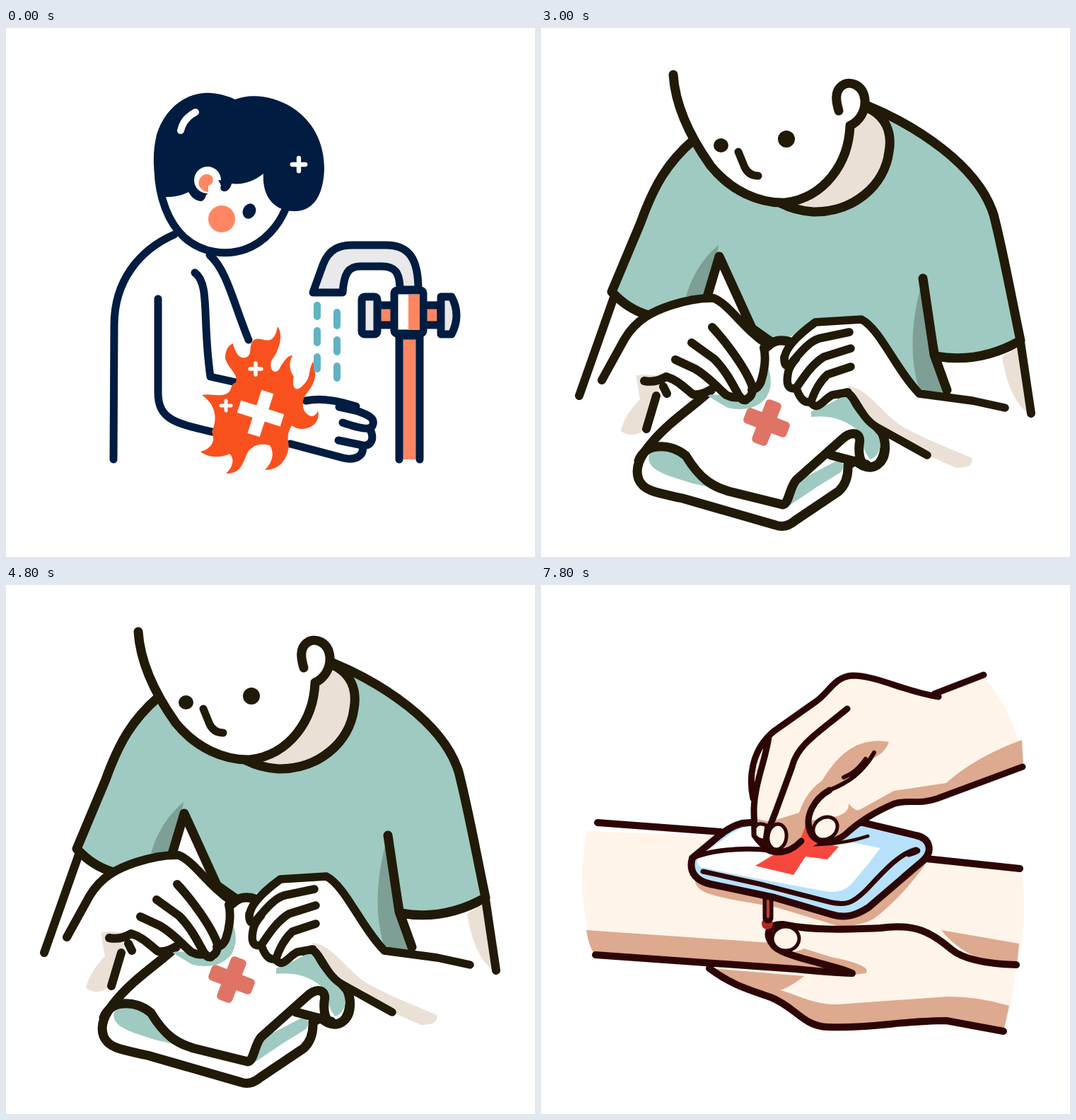
These frames come from a looping animation (748x748 px, 9 s). An HTML page:

```html
<!DOCTYPE html>
<html lang="en">
<head>
<meta charset="utf-8">
<title>Burn first aid</title>
<style>
html, body { margin: 0; height: 100%; overflow: hidden; background: #fff; }
svg { display: block; width: 100vw; height: 100vh; }
.scene { visibility: hidden; stroke-linecap: round; stroke-linejoin: round; fill: none; }
.scene.on { visibility: visible; }
.flat { stroke: none; }
.white { fill: #fff; }
#rinse { stroke: #001c41; stroke-width: 11; }
#rinse .navy { fill: #001c41; }
#rinse .coral { fill: #ff8662; }
#rinse .grey { fill: #e9e8ea; }
#rinse .fire { fill: #f9511e; }
#rinse .water { stroke: #61b2c5; stroke-width: 10; }
#wrap { stroke: #211a09; stroke-width: 13; }
#wrap .teal { fill: #9fcac1; }
#wrap .shade { fill: #7e9f96; }
#wrap .beige { fill: #eae0d5; }
#wrap .ink { fill: #211a09; }
#wrap .cross { fill: #df7466; stroke: #df7466; stroke-width: 11; }
#press { stroke: #2d0505; stroke-width: 10; }
#press .skin { fill: #fef4e9; }
#press .shade { fill: #dda98f; }
#press .blue { fill: #b7e1fa; }
#press .red { fill: #f8483d; }
#press .nail { fill: #fef4e9; stroke-width: 5; }
</style>
</head>
<body>
<svg viewBox="0 0 748 748">
<defs>
  <path id="spark" d="M-8 0H8M0-8V8" stroke="#fff" stroke-width="5.5"/>
</defs>

<g id="rinse" class="scene">
  <!-- head -->
  <path class="white" d="M215 200C216 240 230 276 252 296C278 319 312 322 338 313C366 303 386 279 396 254"/>
  <path class="navy flat" d="M222 239C207 217 206 180 213 151C225 112 256 90 290 92C304 93 316 97 324 101C347 92 378 96 404 112C434 131 450 162 450 199C449 236 435 259 408 259C376 259 362 234 364 206C350 217 335 222 319 220C318 226 313 231 308 231C303 230 302 226 304 221L283 236Q281 244 276 245C267 244 262 239 258 232Q242 240 222 239Z"/>
  <circle class="white flat" cx="285" cy="215" r="19"/>
  <path class="coral flat" d="M286 232C276 231 271 223 273 216C276 206 287 204 292 211C294 217 291 222 286 223Z"/>
  <path class="white flat" d="M288 223L304 222L302 238H288Z"/>
  <path class="navy flat" d="M300 215L319 217Q317 231 308 231Q302 229 304 222Z"/>
  <path d="M247 145C250 132 258 124 268 119" stroke="#fff" stroke-width="10"/>
  <use href="#spark" transform="translate(414 193)scale(1.15)"/>
  <ellipse class="navy flat" cx="344" cy="259" rx="9" ry="11" transform="rotate(25 344 259)"/>
  <circle class="coral flat" cx="305" cy="270" r="19"/>
  <!-- body and arm -->
  <path d="M238 292C188 314 153 358 153 420L152 610M288 321C312 342 321 387 343 441M267 346C289 362 277 410 289 493L325 501M215 383V515C215 555 240 559 300 573"/>
  <path d="M424 527C450 522 475 529 495 535M471 536L498 542C514 548 521 552 519 560C517 570 503 567 476 558M515 568C521 580 517 592 504 590L470 583M504 591C507 605 494 612 477 608L402 588"/>
  <!-- flame -->
  <path class="fire flat" d="M384 422C393 433 386 457 376 469C371 481 379 491 386 483C391 474 397 463 405 463C399 475 401 485 407 493C403 508 410 516 419 506C432 496 427 483 434 472C442 493 434 506 424 518C415 532 421 547 432 549Q438 549 441 541C445 557 432 566 419 567Q411 567 404 562C396 575 399 583 400 593C396 614 384 625 366 625C377 614 380 601 373 590C360 587 352 589 345 596C336 603 338 631 311 630C322 620 323 608 316 602C302 609 285 607 275 599C293 594 296 582 291 571C300 551 296 532 277 519C290 516 304 523 314 516C321 509 316 505 325 501C329 489 314 482 310 467C310 456 314 449 321 446C324 460 331 470 341 465C349 460 342 448 351 441C359 436 368 446 377 439Q382 434 384 422Z"/>
  <path d="M-32 0H32M0-32V32" transform="translate(360 545)rotate(18)" stroke="#fff" stroke-width="18" stroke-linecap="butt"/>
  <use href="#spark" transform="translate(353 482)"/>
  <use href="#spark" transform="translate(311 534)scale(.9)"/>
  <!-- tap -->
  <path class="water" d="M440 392V408M440 428V445M440 465V482M468 402V421M468 441V458M468 478V495"/>
  <path class="grey" d="M434 374L448 335C457 311 473 307 490 307H537C569 307 583 325 583 370H557C557 344 549 337 531 337H501C484 337 478 347 476 374Z"/>
  <path class="coral" d="M556 610V435H585V610"/>
  <path class="coral" d="M523 392H615V420H523Z"/>
  <rect class="grey" x="503" y="380" width="22" height="53" rx="4"/>
  <path class="grey" d="M615 380H630Q644 406 630 433H615Z"/>
  <rect class="white" x="549" y="371" width="41" height="61" rx="4"/>
  <path class="coral flat" d="M569 377H585V427H569Z"/>
</g>

<g id="wrap" class="scene">
  <!-- shirt -->
  <path class="teal flat" d="M216 158C179 190 160 222 141 275L100 373Q123 398 152 406C180 390 205 382 238 380L252 323L298 424L325 443L347 440L390 415L455 413C480 430 505 490 535 516L574 514L560 462Q620 476 680 442C665 380 652 310 640 264C618 194 530 138 462 110Z"/>
  <path class="shade flat" d="M205 379Q219 333 251 307L238 380ZM540 354Q515 440 533 505L538 517L576 516Z"/>
  <path class="white flat" d="M257 345L288 409L247 378Z"/>
  <path d="M216 158C179 190 160 222 141 275L100 373Q123 398 152 406M462 110C530 138 618 194 640 264C653 314 665 380 678 442Q620 475 558 464M540 354L556 462L574 512M235 380L252 323L298 424"/>
  <!-- neck and head -->
  <path class="beige" d="M460 112C487 124 497 147 492 175C486 223 441 261 385 260Q357 258 338 247L437 137Z"/>
  <path class="white" d="M187 66C190 112 213 157 240 195C269 231 309 248 345 247C401 240 435 191 437 138C450 132 459 118 458 102C456 80 436 73 425 82C415 90 417 103 421 117"/>
  <path class="ink flat" d="M335 157a12 12 0 1 0 24 0a12 12 0 1 0-24 0M244 166a10.500 10 0 1 0 21 0a10.500 10 0 1 0-21 0"/>
  <path d="M279 175L288 197Q294 209 307 209" stroke-width="11"/>
  <!-- arm skin -->
  <path class="beige flat" d="M133 483Q151 490 174 488L163 525L149 566Q130 582 113 570Q118 547 140 525Q136 502 133 483ZM652 465L674 451L690 545Q662 527 652 465Z"/>
  <path d="M104 378L54 520M678 444L693 545M163 520L149 567" stroke-width="12"/>
  <!-- cloth -->
  <path class="white" d="M322 449Q333 438 353 444L420 515L485 578C489 602 480 620 467 621Q455 622 445 612L434 618Q435 642 421 655L360 696Q346 708 332 703L200 665C169 658 145 656 138 638C132 621 141 606 152 592C178 558 215 536 240 512Z"/>
  <path class="teal flat" d="M153 603Q184 587 208 614C227 643 241 648 267 656L215 644C172 631 148 624 153 603ZM350 676Q358 647 376 634L420 611Q432 616 424 628L390 649ZM382 542Q410 532 432 517Q442 543 460 557L481 581Q480 606 465 610Q453 594 453 574Q425 545 382 550ZM314 465Q333 497 319 522Q300 545 264 537L232 518L290 520Z"/>
  <path d="M138 612C146 588 181 585 205 605C225 638 242 648 265 655L342 674C351 672 351 650 361 639L425 582C439 569 454 571 450 589C448 613 457 624 470 620C489 614 489 591 483 574M410 604L460 617"/>
  <path class="cross" d="M-6-27H6V-6H27V6H6V27H-6V6H-27V-6H-6Z" transform="translate(319 558)rotate(21)"/>
  <!-- left hand -->
  <path class="white flat" d="M86 498L118 440C135 411 160 400 184 392Q218 381 244 382L315 452L311 500L288 526L256 515L215 515L175 492L145 490Z"/>
  <path d="M86 498L118 440C135 411 160 400 184 392Q218 381 244 382C267 391 285 425 322 449M315 452C319 468 315 488 311 500Q307 510 298 512M242 423C263 445 290 483 298 505Q302 522 287 526M213 445L245 468C261 484 270 502 280 520Q284 527 290 526M190 469L218 482C237 493 249 508 262 519Q272 524 282 522M146 499Q162 502 177 493C194 498 205 511 215 518Q226 520 242 510M173 507L178 517M298 424L325 443" stroke-width="12"/>
  <!-- right hand -->
  <path class="white flat" d="M344 470Q347 447 388 416L455 413C480 430 505 490 535 517L560 580L500 565Q456 511 432 511L408 518L386 537L374 527L355 509L349 486Z"/>
  <path class="beige flat" d="M433 506C462 508 480 545 515 566L550 583L609 608Q613 622 587 622L546 604L474 564Q447 545 433 506Z"/>
  <path d="M344 470Q343 449 388 416L453 412C480 426 501 482 535 517L610 527L656 537M432 515C446 522 451 550 474 564L546 604M436 430L393 439C375 445 360 468 350 478Q343 478 344 465M438 453L400 465C382 476 370 496 361 509Q345 513 349 490Q350 479 361 467M438 479L405 490C394 500 386 516 382 528Q370 533 362 512M382 530C392 543 401 523 412 519L434 515" stroke-width="11.5"/>
</g>

<g id="press" class="scene">
  <!-- forearm -->
  <path class="skin flat" d="M65 348L250 355L545 390L680 405Q688 475 674 537L560 500L480 487L400 546L75 522Q47 432 65 348Z"/>
  <path class="shade flat" d="M64 488L325 506L390 530L430 548L75 522Q67 508 64 488ZM566 488L676 507L673 537Q605 537 566 488ZM218 418C219 438 254 442 330 455L420 482Q452 483 472 471Q512 440 547 390L520 380Z"/>
  <path d="M80 336L254 349M545 387L677 401"/>
  <!-- supporting hand -->
  <path class="skin flat" d="M322 494C325 475 365 483 390 486C425 488 450 485 480 485C530 478 552 493 580 515Q610 537 672 537Q668 590 654 631L573 616L400 625C365 619 351 588 318 579L238 542L440 549C415 537 347 527 330 511Z"/>
  <path class="shade flat" d="M238 542L372 553Q356 566 339 573C368 582 390 594 420 593L575 582Q620 582 662 595L654 631L573 616L400 625C365 619 351 588 318 579ZM344 519Q361 520 372 514L410 526Q470 538 459 549L436 552Z"/>
  <path d="M238 542C270 566 294 572 325 583C360 597 371 624 405 625C470 627 510 616 573 616L654 631M77 523L360 543Q410 548 440 549C415 537 347 527 330 511C315 494 321 479 342 480C385 489 434 487 480 485C530 478 553 492 580 515Q604 535 672 537"/>
  <ellipse class="nail" cx="346" cy="500" rx="19" ry="17"/>
  <!-- drip -->
  <circle class="flat" cx="320" cy="479" r="8" fill="#b4261d"/>
  <path d="M321 443V471" stroke-width="15"/>
  <path d="M321 446V469" stroke="#b8432f" stroke-width="4"/>
  <!-- pad -->
  <path class="blue" d="M214 386C208 407 221 419 240 423L330 442L408 465C432 473 447 466 463 456L540 390C555 376 550 358 530 354L455 336Q350 330 284 337Q266 342 249 357Z"/>
  <path class="white flat" d="M226 381L258 360Q280 341 304 340L340 350L430 362L480 372Q462 396 442 419Q427 438 402 433L310 416L226 399Q217 393 226 381Z"/>
  <path class="red flat" d="M294 370L330 374L370 340L385 362L421 370L405 388L374 384L357 410L303 397L328 382Z"/>
  <path d="M214 386C237 376 282 370 324 375M229 405L310 423L403 447C432 455 441 449 458 433C482 408 504 381 530 374Q539 376 520 381" stroke-width="7"/>
  <path d="M382 367Q426 367 462 355" stroke-width="5"/>
  <!-- pressing hand -->
  <path class="skin flat" d="M626 131Q672 181 682 257L560 302C534 311 520 303 500 309Q459 326 430 353Q399 373 380 354L363 368Q344 386 322 376L302 357L298 285Q298 238 325 212L395 160Q414 128 440 128Q470 130 560 158Z"/>
  <path class="shade flat" d="M680 219Q681 240 682 257L560 302C534 311 520 303 500 309Q459 326 430 353Q399 373 380 354L363 368Q344 386 322 376L302 357L302 330L323 335L365 322Q375 292 397 277C420 240 447 214 492 222Q486 240 462 248L408 295Q384 310 381 333L413 328Q436 324 435 309Q445 322 452 317L499 291L573 280Q614 243 680 219Z"/>
  <path class="red flat" d="M362 368Q372 350 376 332L381 331Q376 350 391 366L380 372Z"/>
  <path d="M562 158C515 151 475 128 440 128C414 130 408 152 387 166L329 207C299 232 293 270 300 302M556 154L626 127M681 257L560 302C534 311 520 303 500 309Q459 326 430 353C412 367 390 365 382 352C370 327 388 301 408 290M322 215C317 250 302 280 301 318L302 354M302 354Q311 367 324 376Q348 383 368 362M433 175C393 208 362 226 355 257L332 320L321 348Q316 371 332 378" stroke-width="9"/>
  <path d="M471 237C455 266 433 280 408 290M459 246Q446 265 428 272M322 222Q316 250 309 263" stroke-width="6"/>
  <ellipse class="nail" cx="402" cy="344" rx="18" ry="15" transform="rotate(-35 402 344)"/>
  <ellipse class="nail" cx="334" cy="356" rx="13" ry="18" transform="rotate(8 334 356)"/>
  <path class="nail" d="M302 344Q306 334 319 340L316 361Q306 361 302 354Z"/>
</g>
</svg>
<script>
const scenes = document.querySelectorAll('.scene');
const HOLD = 3000;

function draw() {
  const current = Math.floor(performance.now() / HOLD) % scenes.length;
  scenes.forEach((scene, i) => scene.classList.toggle('on', i === current));
  requestAnimationFrame(draw);
}
draw();
</script>
</body>
</html>
```
